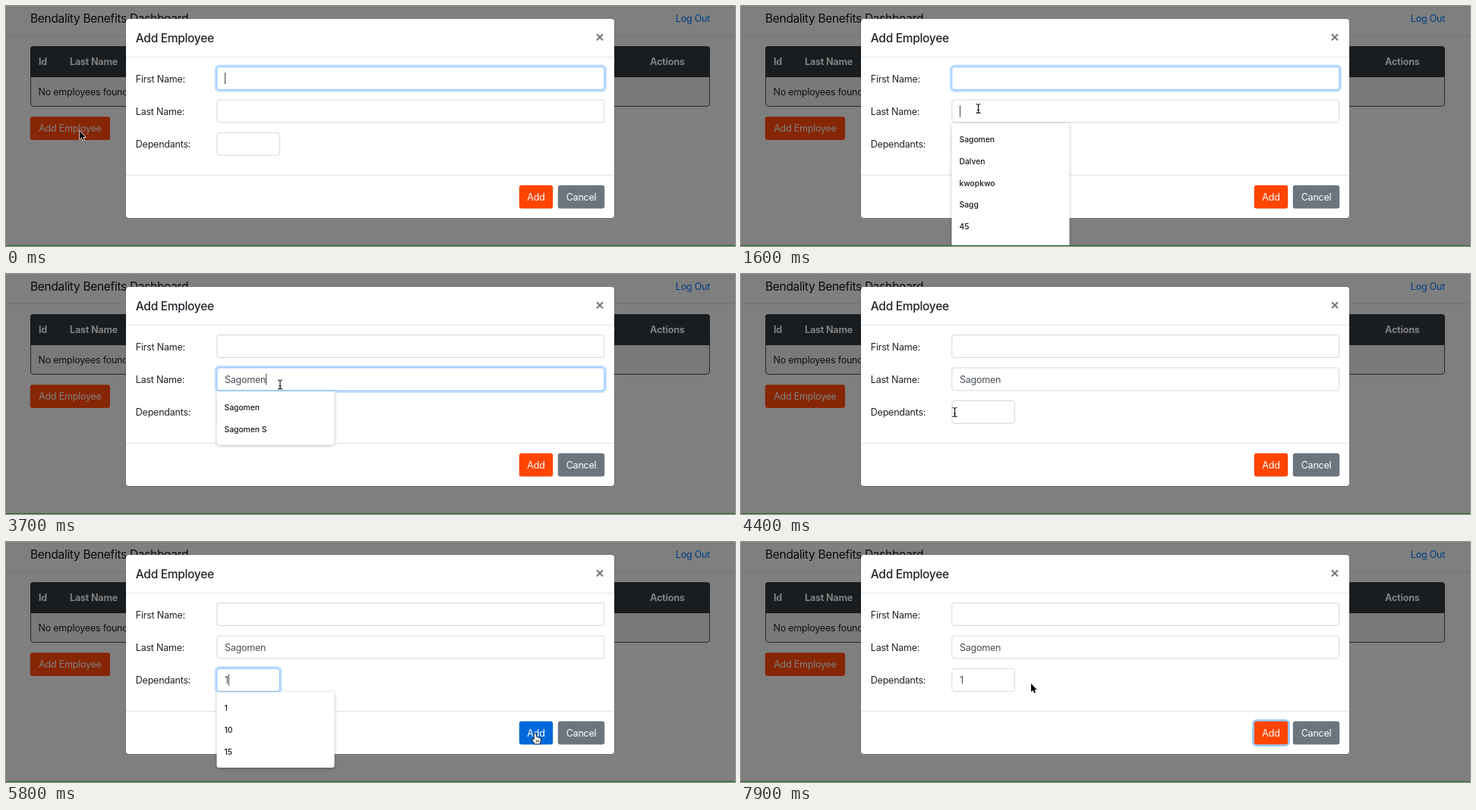
An HTML page with a canvas that plays this animation: 960 px wide and 317 px high, repeating every 8 s.

```html
<!DOCTYPE html>
<html lang="en">
<head>
<meta charset="utf-8">
<title>Add Employee</title>
<style>
  html, body { margin: 0; width: 100%; height: 100%; overflow: hidden; background: #7f7f7f; }
  canvas { display: block; width: 100vw; height: 100vh; }
</style>
</head>
<body>
<canvas id="stage" width="960" height="317"></canvas>
<script>
const ctx = document.getElementById('stage').getContext('2d');
const LOOP = 8000, STEP = 100, FADE = 150, BLINK = 500;
const FONT = 'Inter, Roboto, sans-serif';
const FIELD = { x: 277.8, h: 30, top: 80.5, gap: 43.4 };
const BTN = { y: 236.8, h: 30.6, r: 3.2 };
const TITLE = { size: 15.5, gap: -0.02 };

const clamp = v => Math.max(0, Math.min(1, v));
const smooth = k => k * k * (3 - 2 * k);
const speedUp = k => k * k;
const fade = (t, on, off = Infinity) => clamp((t - on) / FADE) - clamp((t - off) / FADE);
const mix = (a, b, k) => `rgb(${a.map((v, i) => Math.round(v + (b[i] - v) * k))})`;

// on/off: focus times; keyAt: time of the i-th key press
const fields = [
  { label: 'First Name:', w: 510, on: -500, off: 1600, text: '', past: [] },
  { label: 'Last Name:', w: 510, on: 1600, off: 3950, text: 'Sagomen',
    keyAt: i => i ? 2460 + 135 * i : 2300,
    past: ['Sagomen', 'Dalven', 'kwopkwo', 'Sagg', '45', 'Sagomen S'] },
  { label: 'Dependants:', w: 82.5, on: 4500, off: 6000, text: '1',
    keyAt: () => 4700,
    past: ['1', '2', '10', '3', '15'] }
];
fields.forEach((f, i) => {
  f.y = FIELD.top + FIELD.gap * i;
  f.keys = [...f.text].map((c, n) => f.keyAt(n));
});
const allKeys = fields.flatMap(f => f.keys);

// each move glides from the last stop to "to", pulled towards "via"
const home = [97, 165];
const moves = [
  { from: 300, until: 1400, via: [220, 185], to: [312.5, 135.5], ease: smooth },
  { from: 3650, until: 3700, via: [335, 140], to: [361, 146], ease: smooth },
  { from: 3800, until: 4400, via: [345, 215], to: [281.5, 182.5], ease: smooth },
  { from: 4750, until: 5400, via: [560, 310], to: [697, 253], ease: smooth },
  { from: 7000, until: 7900, via: [656, 287], to: [382, 187], ease: speedUp }
];

function rect(x, y, w, h, r, fill, stroke) {
  ctx.beginPath();
  ctx.roundRect(x, y, w, h, r);
  if (fill) { ctx.fillStyle = fill; ctx.fill(); }
  if (stroke) { ctx.strokeStyle = stroke; ctx.lineWidth = 0.9; ctx.stroke(); }
}

function text(str, x, y, color, { size = 12.5, weight = 400, align = 'left', gap = -0.018 } = {}) {
  ctx.font = `${weight} ${size}px ${FONT}`;
  ctx.letterSpacing = size * gap + 'px';
  ctx.textAlign = align;
  ctx.fillStyle = color;
  ctx.fillText(str, x, y);
  return ctx.measureText(str).width;
}

function ring(x, y, w, h, r, rgb, alpha) {
  if (alpha <= 0) return;
  const d = 2.6;
  ctx.beginPath();
  ctx.roundRect(x - d, y - d, w + 2 * d, h + 2 * d, r + d);
  ctx.roundRect(x, y, w, h, r);
  ctx.fillStyle = `rgba(${rgb}, ${alpha})`;
  ctx.fill('evenodd');
}

function button(label, x, w, fill, color = '#fff', y = BTN.y) {
  rect(x, y, w, BTN.h, BTN.r, fill);
  text(label, x + w / 2, y + 20, color, { align: 'center' });
}

function drawPage() {
  rect(0, 0, 960, 317, 0, '#7f7f7f');
  rect(0, 38.5, 960, 1, 0, '#737373');
  text('Bendality Benefits Dashboard', 32, 22, '#090a0b', TITLE);
  text('Log Out', 927, 21, '#003d80', { align: 'right' });

  rect(32.5, 53.5, 894, 79, 4, '#797979', '#1d2023');
  rect(32, 53, 895, 41, [4, 4, 0, 0], '#1a1d20');
  const heads = { Id: 43, 'Last Name': 84, Salary: 764, Actions: 848 };
  for (const [name, x] of Object.entries(heads)) {
    text(name, x, 78, '#808080', { size: 12.6, weight: 700 });
  }
  text('No employees found', 42.5, 118, '#101214');
  button('Add Employee', 31.8, 105.2, '#862604', '#808080', 146.3);
}

function drawModal(t) {
  rect(157.5, 16.5, 644, 264, 4.5, 'rgba(0,0,0,.2)');
  rect(158, 17, 643, 263, 4, '#fff');
  for (const y of [67, 223]) rect(158, y, 643, 1, 0, '#e1e4e7');
  text('Add Employee', 170.8, 47.8, '#212529', { ...TITLE, weight: 500 });

  ctx.beginPath();
  for (const s of [-4, 4]) {
    ctx.moveTo(782 - s, 37.2);
    ctx.lineTo(782 + s, 45.2);
  }
  ctx.strokeStyle = '#7a7a7a';
  ctx.lineWidth = 2.2;
  ctx.stroke();

  const hover = fade(t, 5250, 7100);
  button('Add', 675.8, 44.4, mix([255, 69, 0], [0, 105, 217], hover));
  ring(675.8, BTN.y, 44.4, BTN.h, BTN.r, '38,143,255', 0.5 * fade(t, 5950));
  button('Cancel', 726.8, 61.4, '#6c757d');
}

// returns the typed value while the field has focus, else null
function drawField(f, t) {
  const k = fade(t, f.on, f.off), base = f.y + 20;
  const active = t >= f.on && t < f.off;
  text(f.label, 170.8, base, '#212529');
  rect(FIELD.x, f.y, f.w, FIELD.h, 3.2, '#fff', mix([206, 212, 218], [128, 189, 255], k));
  ring(FIELD.x - .4, f.y - .4, f.w + .8, FIELD.h + .8, 3.6, '0,123,255', 0.25 * k);

  const pressed = f.keys.filter(at => at <= t);
  const value = f.text.slice(0, pressed.length);
  const width = text(value, 288, base, '#495057');
  const since = t - Math.max(0, f.on, ...pressed);
  if (active && since % (2 * BLINK) < BLINK) rect(288 + width, f.y + 7.5, 1, 15, 0, '#3d4247');
  return active ? value : null;
}

function drawList(f, value) {
  const items = f.past.filter(s => s.startsWith(value));
  if (!items.length) return;
  const top = f.y + FIELD.h + 1, row = 28.9;
  ctx.save();
  ctx.shadowColor = 'rgba(0,0,0,.28)';
  ctx.shadowBlur = 4;
  ctx.shadowOffsetY = 1;
  rect(277.5, top, 155, items.length * row + 13, [0, 0, 3, 3], '#fff');
  ctx.restore();
  items.forEach((s, i) =>
    text(s, 287.5, top + 24.8 + i * row, '#16181a', { size: 10.3, weight: 500, gap: 0 }));
}

function pointerAt(t) {
  let start = home;
  for (const m of moves) {
    if (t <= m.from) break;
    const k = m.ease(clamp((t - m.from) / (m.until - m.from)));
    const a = start;
    start = m.to.map((end, i) =>
      (1 - k) ** 2 * a[i] + 2 * k * (1 - k) * m.via[i] + k * k * end);
  }
  return start;
}

// typing hides the pointer until it moves again
function pointerHidden(t) {
  const lastKey = Math.max(0, ...allKeys.filter(at => at <= t));
  const lastMove = Math.max(0, ...moves.map(m => m.from).filter(at => at < t));
  return lastKey > lastMove;
}

function outline(points, fill, stroke) {
  ctx.beginPath();
  points.forEach(([x, y]) => ctx.lineTo(x, y));
  ctx.closePath();
  ctx.lineJoin = 'round';
  ctx.strokeStyle = stroke;
  ctx.lineWidth = 1.5;
  ctx.stroke();
  ctx.fillStyle = fill;
  ctx.fill();
}

function drawArrow() {
  outline([[0, 0], [0, 11], [2.5, 8.7], [4.1, 12.4], [5.9, 11.6], [4.3, 8], [7.6, 8]],
    '#000', '#fff');
}

function drawBeam() {
  ctx.beginPath();
  for (const s of [-1, 1]) {
    ctx.moveTo(-3, 6 * s);
    ctx.quadraticCurveTo(0, 6 * s, 0, 4 * s);
    ctx.quadraticCurveTo(0, 6 * s, 3, 6 * s);
  }
  ctx.moveTo(0, -5); ctx.lineTo(0, 5);
  ctx.moveTo(-1.5, 1.8); ctx.lineTo(1.5, 1.8);
  ctx.strokeStyle = '#111';
  ctx.lineWidth = 1.1;
  ctx.stroke();
}

function drawHand() {
  outline([[-1, 0], [.8, 0], [1.2, 4.6], [7, 6.4], [7, 9.5], [5.6, 13.5],
    [-.4, 13.5], [-4, 8.6], [-3.6, 7.2], [-1.4, 8.6]], '#fff', '#000');
  ctx.fillStyle = '#000';
  for (let i = 0; i < 3; i++) ctx.fillRect(.8 + 1.8 * i, 8.5, .7, 3);
}

function drawPointer(t) {
  if (pointerHidden(t)) return;
  const [x, y] = pointerAt(t);
  const inside = (bx, by, w, h) => x >= bx && x <= bx + w && y >= by && y <= by + h;
  ctx.save();
  ctx.translate(x, y);
  if (inside(676, BTN.y, 44, BTN.h)) drawHand();
  else if (fields.some(f => inside(FIELD.x, f.y, f.w, FIELD.h))) drawBeam();
  else drawArrow();
  ctx.restore();
}

function draw(now) {
  const t = Math.floor((now % LOOP) / STEP) * STEP;
  drawPage();
  drawModal(t);
  const values = fields.map(f => drawField(f, t));
  fields.forEach((f, i) => { if (values[i] !== null) drawList(f, values[i]); });
  rect(0, 316, 960, 1, 0, '#146e18');
  drawPointer(t);
}

const start = performance.now();
function tick() {
  draw(performance.now() - start);
  requestAnimationFrame(tick);
}
tick();
</script>
</body>
</html>
```
